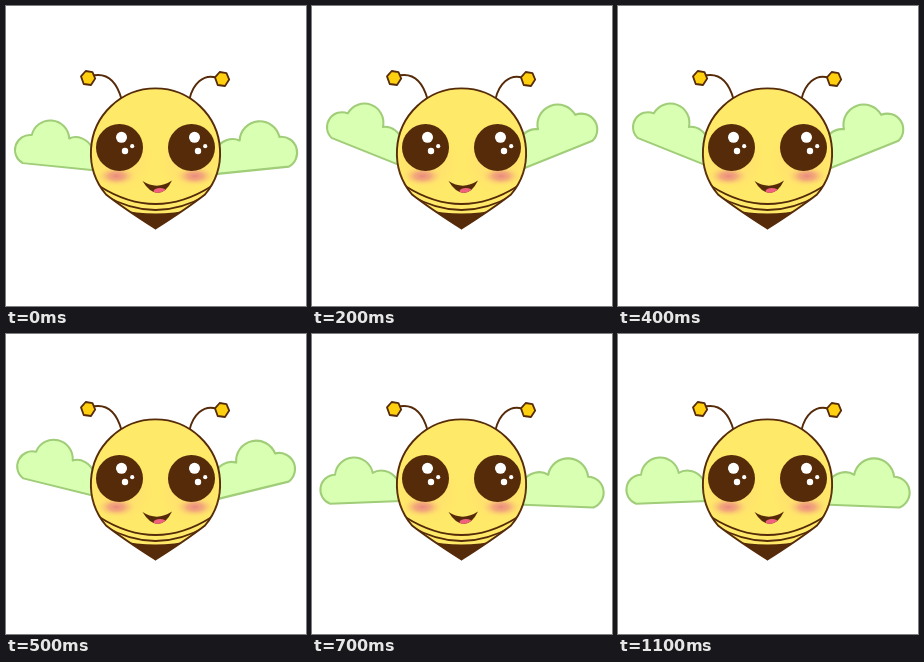
An HTML page that plays this animation: 300 px wide and 300 px high, repeating every 1.2 s.

```html
<!DOCTYPE html>
<html lang="en">
<head>
<meta charset="utf-8">
<title>Flying bee</title>
<style>
  html, body { margin: 0; width: 100%; height: 100%; overflow: hidden; background: #fff; }
  svg { display: block; width: 100%; height: 100%; }
  .wing { fill: #d9ffb2; stroke: #a0cd78; stroke-width: 2; stroke-linejoin: round; }
  .line { fill: none; stroke: #562b0a; stroke-width: 1.9; stroke-linecap: round; }
  .knob { fill: #ffd00f; stroke: #562b0a; stroke-width: 1.8; stroke-linejoin: round; }
  .skin { fill: #ffe968; }
  .dark { fill: #562b0a; }
  .shine { fill: #fff; }
</style>
</head>
<body>
<svg viewBox="0 0 300 300">
  <defs>
    <path id="wing" d="M-24 28 A15 15 0 0 1 -18.8 -1 A19 19 0 0 1 18.8 -2.5 C26 -7 37 -5 43 4 L60 10 L60 25.5Z"/>
    <path id="knob" d="M-7 -1.6 L-2.3 -7 L4.5 -5.9 L7.2 .6 L3 7 L-4.300 6Z"/>
    <g id="shine" class="shine">
      <circle cx="2" cy="-10.200" r="5.500"/>
      <circle cx="5.500" cy="3.500" r="3.200"/>
      <circle cx="12.700" cy="-1.300" r="2.100"/>
    </g>
    <radialGradient id="blush">
      <stop offset="0" stop-color="#ea8a80"/>
      <stop offset=".4" stop-color="#f09c7c" stop-opacity=".8"/>
      <stop offset="1" stop-color="#ffd870" stop-opacity="0"/>
    </radialGradient>
    <radialGradient id="glow">
      <stop offset=".5" stop-color="#ffd078" stop-opacity=".3"/>
      <stop offset="1" stop-color="#ffd878" stop-opacity="0"/>
    </radialGradient>
    <path id="body" d="M100 188.500 A64.600 64.600 0 1 1 199 188.500 Q181 202.500 149.500 222.500 Q118 202.500 100 188.500Z"/>
    <path id="smile" d="M136.500 175 Q151 184.500 166 174.500 Q160 187 151.500 187 Q143 186 136.500 175Z"/>
    <clipPath id="inBody"><use href="#body"/></clipPath>
    <clipPath id="inSmile"><use href="#smile"/></clipPath>
  </defs>

  <g id="left" class="wing"><use href="#wing" transform="translate(-66 -13)"/></g>
  <g id="right" class="wing"><use href="#wing" transform="translate(-66 -13) scale(1.06)"/></g>

  <g id="bee">
    <path class="line" d="M115.500 93 C111 77 102 67 88 69.300 M183.500 93 C187 78 197 68 210 71.500"/>
    <use class="knob" href="#knob" x="82" y="72"/>
    <use class="knob" href="#knob" x="216" y="73"/>

    <use class="skin" href="#body"/>
    <g clip-path="url(#inBody)">
      <path class="dark" d="M112 203 Q149.500 212 187 203 L149.500 230Z"/>
      <path class="line" d="M94 180.500 Q149.500 215.500 205 180.500 M98 189 Q149.500 219 201 189"/>
    </g>
    <use class="line" href="#body"/>

    <circle cx="115" cy="155" r="32" fill="url(#glow)"/>
    <circle cx="184" cy="155" r="32" fill="url(#glow)"/>
    <ellipse cx="110.500" cy="170" rx="20" ry="10" fill="url(#blush)"/>
    <ellipse cx="189" cy="170" rx="20" ry="10" fill="url(#blush)"/>
    <circle class="dark" cx="113.500" cy="141.500" r="23.500"/>
    <circle class="dark" cx="185.500" cy="141.500" r="23.500"/>
    <use href="#shine" x="113.500" y="141.500"/>
    <use href="#shine" x="186.500" y="141.500"/>
    <use class="dark" href="#smile"/>
    <ellipse cx="154" cy="185" rx="6.500" ry="3" fill="#f0627c" clip-path="url(#inSmile)"/>
  </g>
</svg>
<script>
  const STEP = 100, STEPS = 12;
  const PEAK = 3;   // step at which the bee is highest
  const LEVEL = 4;  // pose in which the wings lie flat
  const part = id => document.getElementById(id);
  const bee = part("bee"), left = part("left"), right = part("right");

  // Body bob: a hop over the upstroke, then an even sink
  const hop = [-5, 0, 3];
  const lift = pose => hop[pose] ?? Math.ceil((pose - 3) * 7 / 3);

  function draw(ms) {
    const step = Math.floor(Math.max(0, ms) / STEP) % STEPS;
    const pose = Math.min((step - PEAK + STEPS) % STEPS, (PEAK - step + STEPS) % STEPS);
    const below = Math.max(0, pose - LEVEL);
    const tilt = 31.5 - 8 * pose - 4.7 * below;

    // Below level the wings also slide up and in toward the body
    const flap = (wing, x, y, slide, side) => wing.setAttribute("transform",
      `translate(${x + side * slide * below} ${y - 1.8 * slide * below}) scale(${side} 1) rotate(${tilt})`);

    bee.setAttribute("transform", `translate(0 ${lift(pose)})`);
    flap(left, 108, 154, 4.6, 1);
    flap(right, 190, 156, 3, -1);
  }

  const start = performance.now();
  function tick() {
    draw(performance.now() - start);
    requestAnimationFrame(tick);
  }
  tick();
</script>
</body>
</html>
```
